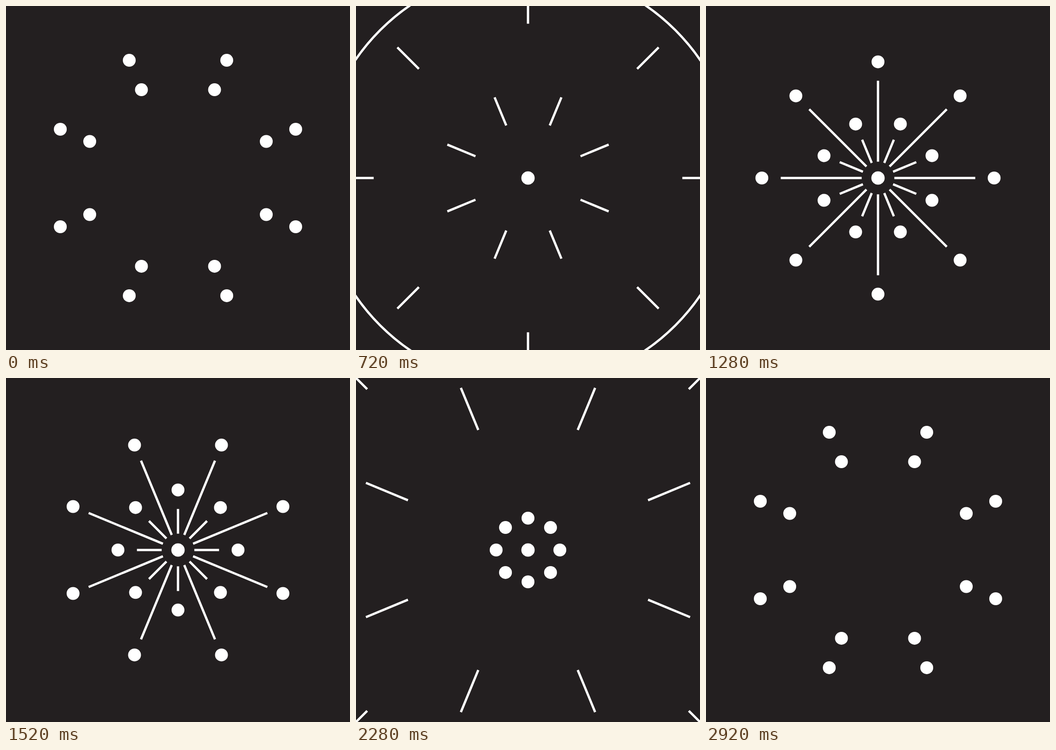
Write an HTML page that moves like this. It is 748 by 748 pixels and loops after 3000 ms.

```html
<!DOCTYPE html>
<html lang="en">
<head>
<meta charset="utf-8">
<title>Radial burst</title>
<style>
  html, body { margin: 0; width: 100%; height: 100%; overflow: hidden; background: #231f20; }
  svg { display: block; width: 100vw; height: 100vh; }
</style>
</head>
<body>
<svg viewBox="0 0 748 748">
  <rect width="748" height="748" fill="#231f20"/>
  <g id="rings" fill="none" stroke="#fff" stroke-width="5"></g>
  <path id="lines" fill="none" stroke="#fff" stroke-width="5"/>
  <g id="dots" fill="#fff"></g>
</svg>
<script>
const LOOP = 3000, TICK = 40, MID = 374;
const AXIS = 0, HALF = Math.PI / 8;
const STEP = 69.25, REACH = 4 * STEP;
const SPEED = 1.766;

const $ = id => document.getElementById(id);
const clamp = u => Math.max(0, Math.min(1, u));
const part = (t, a, b) => clamp((t - a) / (b - a));
const mix = (a, b, u) => a + (b - a) * u;
const easeIn = u => u * u;
const easeOut = u => 1 - (1 - u) * (1 - u);
const easeBoth = u => (1 - Math.cos(Math.PI * u)) / 2;

// [start, duration]
const waves = [[240, 430], [480, 430], [720, 430]];
for (let i = 0; i < 5; i++) waves.push([1760 + 40 * i, 400]);

// [head start, tail start, angle offset]
const rays = [];
for (let i = 0; i < 4; i++) rays.push([252.5 + 120 * i, 290 + 120 * i, i % 2 ? HALF : AXIS]);
rays.push([1944, 2000, AXIS], [2064, 2120, HALF]);

let rings, lines, dots;

const at = (r, a) => [MID + r * Math.sin(a), MID - r * Math.cos(a)];
const circle = (x, y, r) => `<circle cx="${x.toFixed(2)}" cy="${y.toFixed(2)}" r="${r.toFixed(2)}"/>`;

function spokes(offset, draw) {
  for (let i = 0; i < 8; i++) draw(offset + i * Math.PI / 4);
}

function centre() {
  dots += circle(MID, MID, 14.5);
}

function dotRing(r, offset) {
  if (r < 1) centre();
  else spokes(offset, a => dots += circle(...at(r, a), 14));
}

function lineRing(from, to, offset) {
  if (to <= from || from > 560) return;
  spokes(offset, a => lines += `M${at(from, a)}L${at(to, a)}`);
}

function arm(r, gap, offset) {
  dotRing(r, offset);
  lineRing(35.5, r - gap, offset);
}

function star(t) {
  const swap = easeBoth(part(t, 1160, 1655));
  const fold = 1 - easeIn(part(t, 1655, 1760));
  const axis = t < 1160 ? REACH * easeOut(part(t, 827, 1160)) : mix(REACH, 100, swap);
  const half = t < 1160 ? 103 * easeOut(part(t, 860, 1040)) : mix(103, REACH, swap);
  const lag = Math.sin(Math.PI * part(t, 1160, 1655)) * 3;
  arm(axis * fold, 39 + lag, AXIS);
  arm(half * fold, 39 - lag, HALF);
}

// Pairs of dot rings that step outwards, flipping between the two angles.
function twinkle(t) {
  const beat = Math.floor((t - 2200) / 120);
  const inner = Math.ceil(beat / 2);
  const offset = beat > 0 && beat % 2 === 0 ? HALF : AXIS;
  dotRing(inner * STEP, offset);
  dotRing((inner + 1) * STEP, offset);
}

function implode(t) {
  const u = 1 - easeIn(part(t, 0, 240));
  dotRing(3 * STEP * u, HALF);
  dotRing(REACH * u, HALF);
}

function render(t) {
  rings = lines = dots = "";
  for (const [start, span] of waves) {
    const u = (t - start) / span;
    if (u > 0 && u < 1) rings += circle(373.5, 373.5, 564 * easeOut(u));
  }
  for (const [head, tail, offset] of rays) {
    lineRing(Math.max(0, t - tail) * SPEED, Math.max(0, t - head) * SPEED, offset);
  }
  if (t < 40) twinkle(2920);
  else if (t < 240) implode(t);
  else if (t < 1760) centre();
  if (t > 827 && t < 1760) star(t);
  if (t >= 2200) twinkle(t);

  $("rings").innerHTML = rings;
  $("lines").setAttribute("d", lines);
  $("dots").innerHTML = dots;
}

const begin = performance.now();
function tick() {
  const t = (performance.now() - begin) % LOOP;
  render(Math.floor(t / TICK) * TICK);
  requestAnimationFrame(tick);
}
tick();
</script>
</body>
</html>
```
